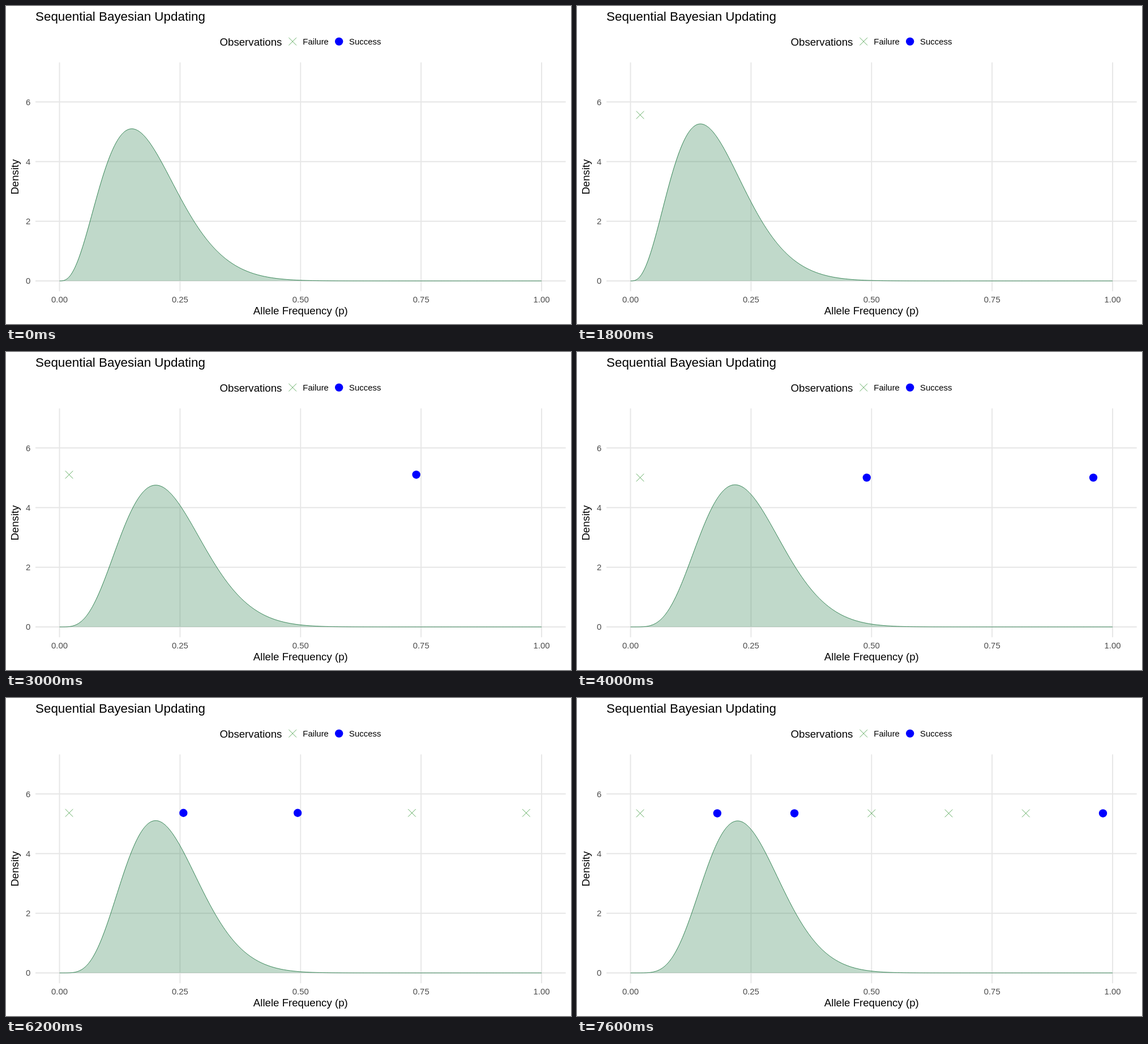
Animation, 998 px wide and 561 px high, one loop 8 s. Source, as an HTML page:

```html
<!DOCTYPE html>
<html lang="en">
<head>
<meta charset="utf-8">
<title>Sequential Bayesian Updating</title>
<style>
  html, body { margin: 0; width: 100%; height: 100%; overflow: hidden; background: #fff; }
  svg { display: block; width: 100%; height: 100%; font-family: "Liberation Sans", Arial, sans-serif; }
  .grid { stroke: #e6e6e6; stroke-width: 1.9; }
  .tick { font-size: 14.93px; fill: #4d4d4d; }
  .title { font-size: 22.4px; }
  .heading { font-size: 18.67px; }
  .label { font-size: 14.93px; }
  .area { fill: #2e8050; fill-opacity: .3; }
  .curve { fill: none; stroke: #2e8050; stroke-width: .95; }
  .success { fill: #00f; }
  .failure { fill: none; stroke: #228b22; stroke-width: .7; }
</style>
</head>
<body>
<svg viewBox="0 0 998 561">
  <g id="grid"></g>
  <path id="area" class="area"/>
  <path id="curve" class="curve"/>
  <g id="points"></g>
  <g id="legend"></g>
  <text class="title" x="52" y="26.3">Sequential Bayesian Updating</text>
  <text class="heading" x="377.5" y="70">Observations</text>
  <text class="label" x="524.3" y="68">Failure</text>
  <text class="label" x="606" y="68">Success</text>
  <text class="heading" x="520.3" y="544.3" text-anchor="middle">Allele Frequency (p)</text>
  <text class="heading" transform="translate(22.3 301.5) rotate(-90)" text-anchor="middle">Density</text>
</svg>
<script>
const LOOP = 8000, FIRST_CHANGE = 700, PERIOD = 1100, STEP = 100, STEPS = 4;
const OUTCOMES = "FSSFFFS".replace("FSSFFFS", "FSSFFFS").split("");
const PRIOR = { a: 4, b: 18 };
const SAMPLES = 500;

const $ = id => document.getElementById(id);
const px = p => 94.5 + 851.6 * p;
const py = d => 485 - 52.63 * d;
const mix = (a, b, k) => a + (b - a) * k;
const cubicInOut = t => t < .5 ? 4 * t ** 3 : 1 - 4 * (1 - t) ** 3;

function add(parent, name, attrs, text = "") {
  const el = document.createElementNS("http://www.w3.org/2000/svg", name);
  for (const key in attrs) el.setAttribute(key, attrs[key]);
  el.textContent = text;
  return parent.appendChild(el);
}

function addMark(parent, outcome) {
  return outcome === "S"
    ? add(parent, "circle", { class: "success", r: 7.2 })
    : add(parent, "path", { class: "failure", d: "M-6.8-6.8L6.8 6.8M-6.8 6.8L6.8-6.8" });
}

const place = (el, x, y) => el.setAttribute("transform", `translate(${x} ${y})`);

function betaDensity(a, b) {
  let scale = 1;
  for (let i = 1; i < a; i++) scale *= (b + i - 1) / i;
  scale *= a + b - 1;
  return p => scale * p ** (a - 1) * (1 - p) ** (b - 1);
}

// One state per number of observations seen so far.
const states = Array.from({ length: OUTCOMES.length + 1 }, (_, n) => {
  const wins = OUTCOMES.slice(0, n).filter(o => o === "S").length;
  const density = betaDensity(PRIOR.a + wins, PRIOR.b + n - wins);
  const values = Array.from({ length: SAMPLES + 1 }, (_, i) => density(i / SAMPLES));
  const gap = n > 1 ? .96 / (n - 1) : 0;
  return { n, values, top: 1.05 * Math.max(...values), spot: i => .02 + gap * i };
});

for (const d of [0, 2, 4, 6]) {
  add($("grid"), "path", { class: "grid", d: `M52 ${py(d)}H988.7` });
  add($("grid"), "text", { class: "tick", x: 43.3, y: py(d) + 5.3, "text-anchor": "end" }, d);
}
for (const p of [0, .25, .5, .75, 1]) {
  add($("grid"), "path", { class: "grid", d: `M${px(p)} 99.5V503.3` });
  add($("grid"), "text", { class: "tick", x: px(p), y: 523.3, "text-anchor": "middle" }, p.toFixed(2));
}
place(addMark($("legend"), "F"), 506.2, 62.6);
place(addMark($("legend"), "S"), 588.2, 62.6);
const marks = OUTCOMES.map(o => addMark($("points"), o));

function draw(from, to, k) {
  const line = from.values
    .map((v, i) => `${px(i / SAMPLES).toFixed(2)} ${py(mix(v, to.values[i], k)).toFixed(2)}`)
    .join("L");
  $("curve").setAttribute("d", `M${line}`);
  $("area").setAttribute("d", `M${line}L${px(1)} ${py(0)}H${px(0)}Z`);

  // A new observation appears only once its transition is complete.
  const shown = k === 1 ? to.n : from.n;
  const y = py(mix(from.top, to.top, k));
  marks.forEach((mark, i) => {
    mark.style.display = i < shown ? "" : "none";
    place(mark, px(mix(from.spot(i), to.spot(i), k)), y);
  });
}

let lastKey = "";
function frame(now) {
  const sinceFirst = now % LOOP - FIRST_CHANGE;
  const index = Math.floor(sinceFirst / PERIOD);
  const step = Math.min(STEPS, Math.floor((sinceFirst - index * PERIOD) / STEP) + 1);
  const key = index + ":" + step;
  if (key !== lastKey) {
    lastKey = key;
    if (index < 0) draw(states[0], states[0], 1);
    else draw(states[index], states[index + 1], cubicInOut(step / STEPS));
  }
  requestAnimationFrame(frame);
}
frame(performance.now());
</script>
</body>
</html>
```
